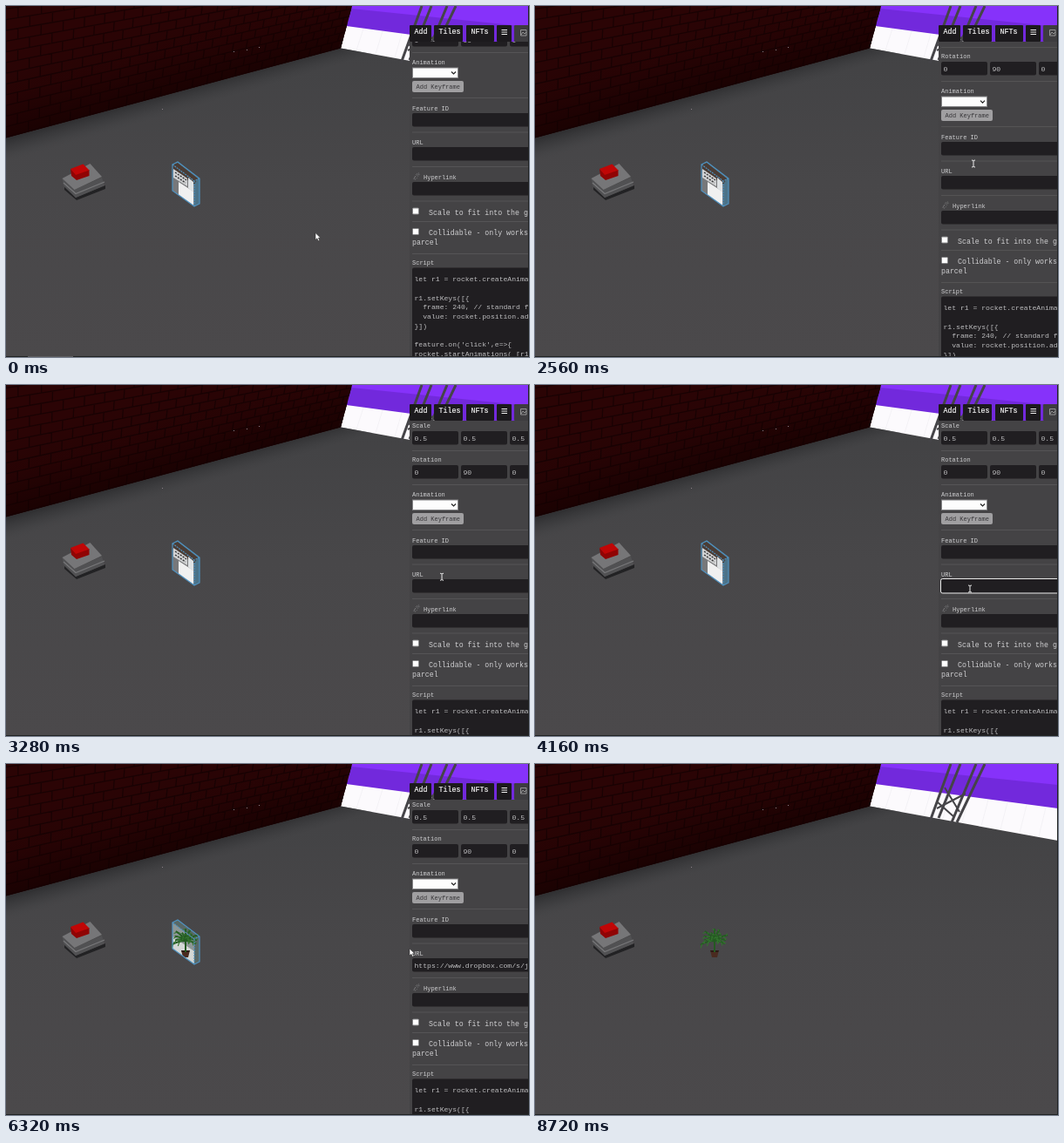
Write an HTML page that moves like this. It is 600 px wide and 403 px high and loops after 9.12 s.

```html
<!DOCTYPE html>
<html lang="en">
<head>
<meta charset="utf-8">
<title>Scene editor</title>
<style>
html, body { margin: 0; width: 100%; height: 100%; overflow: hidden; background: #49484a; }
svg { display: block; width: 600px; height: 403px; }
text { font-family: "Liberation Mono", "DejaVu Sans Mono", monospace; font-size: 8.1px; fill: #bdbdbf; white-space: pre; }
.label { font-size: 7px; fill: #cfcfd1; }
.check { font-size: 8.25px; fill: #cfcfd1; }
.tab { font-size: 8.3px; fill: #f4f4f4; stroke: #f4f4f4; stroke-width: 0.2px; }
</style>
</head>
<body>
<svg id="stage" viewBox="0 0 600 403" xmlns="http://www.w3.org/2000/svg">
  <defs>
    <linearGradient id="floor" x1="0" y1="0" x2="0" y2="1">
      <stop offset="0.1" stop-color="#424244"/><stop offset="0.5" stop-color="#484749"/><stop offset="1" stop-color="#4b494b"/>
    </linearGradient>
    <linearGradient id="shade" gradientUnits="userSpaceOnUse" x1="190" y1="100" x2="197" y2="125">
      <stop offset="0" stop-color="#303032"/><stop offset="0.5" stop-color="#3d3d3f" stop-opacity="0.75"/><stop offset="1" stop-color="#464648" stop-opacity="0"/>
    </linearGradient>
    <linearGradient id="wallShade" gradientUnits="userSpaceOnUse" x1="190" y1="100" x2="165" y2="7">
      <stop offset="0" stop-color="#100" stop-opacity="0.65"/><stop offset="0.5" stop-color="#100" stop-opacity="0.15"/><stop offset="1" stop-color="#100" stop-opacity="0"/>
    </linearGradient>
    <clipPath id="wallClip"><path d="M0 0H397L384 48.500L0 151.500Z"/></clipPath>
    <clipPath id="panelClip"><path d="M463 41H600V403H463Z"/></clipPath>
  </defs>

  <rect width="600" height="403" fill="url(#floor)"/>
  <path d="M397 0H600V88L384 48.500Z" fill="#fcfafd"/>
  <path id="tiles" stroke="#f0eef3" stroke-width="0.7" fill="none"/>
  <path d="M397 0H600V51L390.500 23Z" fill="#7229dc"/>
  <path d="M397 0H600V24L396.500 3Z" fill="#8632fa"/>
  <g stroke="#454448" stroke-width="3" fill="none">
    <path d="M477 0L453 66M488 0L463 62M506 0L478 67M516 0L484 67"/>
    <path d="M470 27L487 55M494 34L461 51M462 44L481 61" stroke-width="2"/>
  </g>
  <path d="M0 151.500L384 48.500L420 55L0 180Z" fill="url(#shade)"/>
  <g clip-path="url(#wallClip)">
    <rect width="400" height="152" fill="#2b0405"/>
    <path id="bricks" fill="none" stroke="#190203" stroke-width="1.3"/>
    <rect width="400" height="152" fill="url(#wallShade)"/>
  </g>
  <path d="M261 52h1v1h-1zM276 50h1v1h-1zM290 47h1v1h-1zM179 118h1v1h-1z" fill="#8b8189"/>

  <g id="button">
    <path d="M67 208L80 220L114 206V210L81 223L67 211Z" fill="#222224"/>
    <path d="M64.500 198L78.500 211L110 197L113 206L80 220L66 206Z" fill="#515153"/>
    <path d="M66 203L80 215.500L113 202" fill="none" stroke="#777779" stroke-width="1.300"/>
    <path d="M64.500 198L96.500 181L110 196L78.500 211Z" fill="#767678"/>
    <path d="M74 187L80 193L95.500 188V195L81 200L75 195Z" fill="#900404"/>
    <path d="M74 187L88.500 181.500L95.500 188.500L80 194Z" fill="#c00606"/>
  </g>

  <g id="placeholder">
    <path d="M191 182L197 179L222 198V227L216 230L191 212Z" fill="#4b7288"/>
    <path d="M191 182L216 201V230L191 212Z" fill="#77787a"/>
    <path d="M191 182L197 180L220 198L216 205L191 188Z" fill="#4a3c35"/>
    <path d="M192 187L208 198V207L192 197Z" fill="#d3d4d5"/>
    <path d="M194 191L207 200M194 195L206 203" stroke="#39393b" stroke-width="1.5" stroke-dasharray="2.200 1.300"/>
    <path d="M198 202L215 213V229L198 217Z" fill="#f0f0f0"/>
    <path d="M209 197L215 202V214L209 209Z" fill="#dfe2e4"/>
  </g>
  <g id="loadedBox">
    <path d="M191 182L197 179L222 198V227L216 230L191 212Z" fill="#596866"/>
    <path d="M191 182L216 201V230L191 212Z" fill="#8d9696"/>
    <path d="M191 198L216 215V230L191 212Z" fill="#d3d7d5"/>
  </g>
  <g id="plant">
    <path d="M201 214H211L209 222H203Z" fill="#4a2b20"/>
    <path d="M201 214H211L210 216H202Z" fill="#2c1a15"/>
    <path id="fronds" fill="none" stroke="#245a22" stroke-width="2"/>
    <path id="leaflets" fill="none" stroke="#34742f" stroke-width="1.1"/>
  </g>
  <g id="outline" fill="none" stroke="#4f91bf" stroke-width="1.2">
    <path d="M191 182L197 179L222 198V227L216 230L191 212Z"/>
    <path d="M191 182L216 201L222 198M216 201V230" stroke-dasharray="2 1"/>
  </g>
  <path id="brackets" d="M192.500 194V188.500H198M218 188.500H224.500V194M224.500 213V219.500H218M198 219.500H192.500V213" fill="none" stroke="#69696b"/>

  <g id="editor">
    <g clip-path="url(#panelClip)">
      <rect x="463" y="41" width="137" height="362" fill="#444345"/>
      <g id="content"></g>
    </g>
    <g id="tabs"></g>
  </g>
  <path d="M599.5 0V403M0 402.500H600" stroke="#202222" stroke-width="1"/>
  <path id="progress" d="M25 402.500H77" stroke="#5c5c5e" stroke-width="1"/>
  <path id="arrow" d="M0 0V8L1.900 6.300L3.300 9.200L4.700 8.500L3.300 5.800H5.800Z" fill="#fff" stroke="#222" stroke-width="0.5"/>
  <path id="beam" d="M-2 -4Q0 -4 0 -3Q0 -4 2 -4M0 -3V3M-2 4Q0 4 0 3Q0 4 2 4" fill="none" stroke="#eee" stroke-width="1"/>
</svg>
<script>
const LOOP = 9120, STEP = 40;
const el = id => document.getElementById(id);
const show = (id, on) => el(id).setAttribute("display", on ? "inline" : "none");
const place = (id, x, y) => el(id).setAttribute("transform", `translate(${x.toFixed(2)} ${y.toFixed(2)})`);

function add(parent, tag, attrs, text) {
  const node = document.createElementNS("http://www.w3.org/2000/svg", tag);
  for (const key in attrs) node.setAttribute(key, attrs[key]);
  if (text !== undefined) node.textContent = text;
  parent.append(node);
  return node;
}
const box = (parent, x, y, width, height, fill, rx = 0, stroke = "none") =>
  add(parent, "rect", { x, y, width, height, fill, rx, stroke });
const write = (x, y, text, cls = "", fill) => {
  const node = add(el("content"), "text", { x, y, class: cls }, text);
  if (fill) node.style.fill = fill;
  return node;
};

function buildScene() {
  // Rows and joints converge towards the far corner.
  const wallPoint = (u, row) => {
    const s = u * 1.5 / (1 + u * 0.5);
    const x = s * (384 + 2.4 * row);
    const y = 151 - 12.3 * row + s * (-103 + 3.3 * row);
    return `${x.toFixed(1)} ${y.toFixed(1)}`;
  };
  let d = "";
  for (let row = 0; row < 17; row++) {
    d += `M${wallPoint(0, row)}L${wallPoint(1.05, row)}`;
    for (let i = 0; i < 23; i++) {
      const u = (i + (row % 2) / 2) / 22;
      d += `M${wallPoint(u, row)}L${wallPoint(u, row + 1)}`;
    }
  }
  el("bricks").setAttribute("d", d);

  d = "";
  for (let i = 0; i < 10; i++) d += `M${410 + i * 22} ${26 + i * 3}L${402 + i * 22} ${51 + i * 4}`;
  el("tiles").setAttribute("d", d);
}

function buildPlant() {
  const cx = 206, cy = 203;
  let fronds = "M206 216V202", leaflets = "";
  for (let i = 0; i < 11; i++) {
    const angle = Math.PI * (0.9 + i * 0.12);
    const reach = 14 + 3 * Math.cos(i * 2.3);
    const dx = Math.cos(angle) * reach, dy = Math.sin(angle) * reach * 0.9;
    const point = p => [cx + dx * p, cy + dy * p + 2 * p * p - 2 * p];
    const [x1, y1] = point(0.5), [x2, y2] = point(1);
    fronds += `M${cx} ${cy}Q${x1} ${y1 - 2} ${x2} ${y2}`;
    for (let j = 1; j < 5; j++) {
      const [x, y] = point(j / 4.5);
      const side = j % 2 ? 1 : -1;
      leaflets += `M${x} ${y}l${dx * 0.14 - side * dy * 0.17} ${dy * 0.14 + side * dx * 0.17 + 1}`;
    }
  }
  el("fronds").setAttribute("d", fronds);
  el("leaflets").setAttribute("d", leaflets);
}

function buildPanel() {
  const content = el("content"), dark = "#201e21";
  const field = y => box(content, 466, y, 140, 15.5, dark, 2);
  const triple = (y, values) => values.forEach((value, i) => {
    box(content, 466 + i * 56, y, 53, 15.5, dark, 2);
    write(468.5 + i * 56, y + 10.5, value);
  });
  for (const y of [14, 53, 105, 144.5, 184, 223.5, 247, 284])
    box(content, 466, y, 134, 1, "#555456");

  write(466, -12, "Scale", "label");
  triple(-8, ["0.5", "0.5", "0.5"]);
  write(466, 27, "Rotation", "label");
  triple(31, ["0", "90", "0"]);
  write(466, 66.5, "Animation", "label");
  box(content, 466.5, 71, 52, 11.500, "#fdfdfd", 0, "#858587");
  add(content, "path", { d: "M511 75.500l2.500 2.500l2.500 -2.500", fill: "none", stroke: "#222", "stroke-width": 1.2 });
  box(content, 466, 86, 59, 13, "#a09fa1", 2);
  write(470.5, 94.500, "Add Keyframe", "label", "#363538");
  write(466, 119.500, "Feature ID", "label");
  field(123);
  write(466, 158.500, "URL", "label");
  field(162);
  const url = write(468.5, 172.800, "https://www.dropbox.com/s/j");
  url.id = "url";
  add(content, "rect", { id: "focus", x: 465.5, y: 161.500, width: 140, height: 16.500, rx: 2, fill: "none", stroke: "#e8e8e8" });
  add(content, "path", { id: "caret", d: "M468.500 165V175", stroke: "#eee", "stroke-width": 0.9 });
  add(content, "path", { d: "M468 198l5 -5M470 194l2 -2h2v2l-2 2M470 195l-2 2v2h2l2 -2", fill: "none", stroke: "#858587", "stroke-width": 0.8, "stroke-dasharray": "1 1" });
  write(479, 198.500, "Hyperlink", "label");
  field(202);
  for (const y of [232, 255.5]) box(content, 466.5, y, 7, 7, "#fff", 1, "#858587");
  write(485, 239.500, "Scale to fit into the gr", "check");
  write(485, 263, "Collidable - only works", "check");
  write(466, 274, "parcel", "check");
  write(466, 297, "Script", "label");
  box(content, 466, 300.500, 140, 180, dark, 2);
  [
    "let r1 = rocket.createAnima", "", "r1.setKeys([{", "  frame: 240, // standard f",
    "  value: rocket.position.ad", "}])", "", "feature.on('click',e=>{", "rocket.startAnimations( [r1"
  ].forEach((line, i) => write(468.5, 316.300 + i * 10.65, line));

  const tabs = el("tabs");
  [[463, 25, "Add"], [491, 33, "Tiles"], [528, 32, "NFTs"], [563, 17], [583, 17]].forEach(([x, width, title], i) => {
    box(tabs, x, 22, width, 19, i === 4 ? "#3d3c3f" : "#1c1a1d", 1);
    if (title) add(tabs, "text", { x: x + 5.5, y: 32.300, class: "tab" }, title);
  });
  add(tabs, "path", { d: "M568.500 27.500H575M568.500 30H575M568.500 32.500H575", stroke: "#eee" });
  add(tabs, "path", { d: "M590.500 27.500H597V34H590.500ZM591 33l2 -3l2 2l2 -2", fill: "none", stroke: "#aaa", "stroke-width": 0.8 });
}

// Keys are [time, value, value...]; values ease between neighbours.
function track(keys, t) {
  let i = 0;
  while (i < keys.length - 1 && keys[i + 1][0] <= t) i++;
  const a = keys[i], b = keys[i + 1] || a;
  const p = a === b || t < a[0] ? 0 : (t - a[0]) / (b[0] - a[0]);
  const e = p * p * (3 - 2 * p);
  return a.slice(1).map((v, n) => v + (b[n + 1] - v) * e);
}

const pointerKeys = [
  [40, 355, 260.5], [840, 328.5, 241], [1880, 328.5, 241], [2320, 503, 181],
  [2960, 503, 181], [3440, 499, 234], [5600, 499, 234], [6160, 463, 212]
];
const scrollKeys = [[2320, 0], [2720, 51], [2800, 51], [2960, 61]];

function render(t) {
  const [x, y] = track(pointerKeys, t);
  const [scroll] = track(scrollKeys, t);
  const editing = t < 6800;
  const loaded = t >= 5240;
  const focused = t >= 3560 && t < 6000;
  const pasted = t >= 4840;
  const overField = x > 466 && t > 2200;

  place("content", 0, scroll);
  show("editor", editing);
  show("focus", focused);
  show("caret", focused && !pasted && (t - 3560) % 1000 < 500);
  show("url", pasted);
  show("placeholder", !loaded);
  show("loadedBox", loaded && editing);
  show("plant", loaded);
  show("outline", editing);
  show("brackets", !editing && t < 7960);
  show("progress", t < 200);
  show("arrow", editing && !overField);
  show("beam", editing && overField);
  place("arrow", x, y);
  place("beam", x, y);
}

buildScene();
buildPlant();
buildPanel();
const start = performance.now();
function tick() {
  const t = (performance.now() - start) % LOOP;
  render(Math.floor(t / STEP) * STEP);
  requestAnimationFrame(tick);
}
tick();
</script>
</body>
</html>
```
